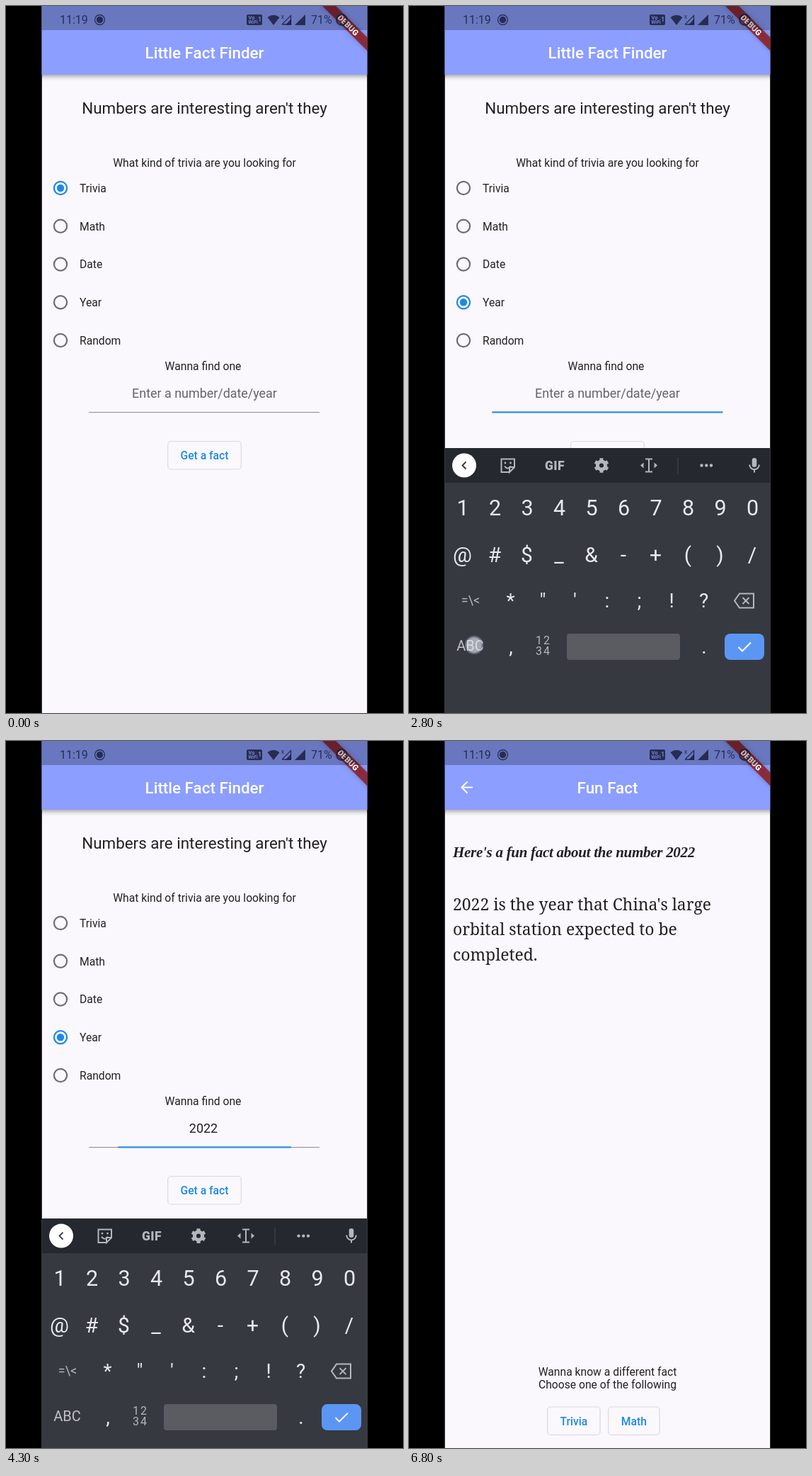
An HTML page with a canvas that plays this animation: 561x998 px, repeating every 7000 ms.

```html
<!DOCTYPE html>
<html lang="en">
<head>
<meta charset="utf-8">
<title>Number facts</title>
<style>
html, body { margin: 0; width: 100%; height: 100%; overflow: hidden; background: #000; }
canvas { display: block; }
</style>
</head>
<body>
<canvas id="stage" width="561" height="998"></canvas>
<script>
const W = 561, H = 998, LOOP = 7000, MID = 280.5;
const LEFT = 50.5, WIDTH = 460;
const BLUE = '#1e88e5', PAPER = '#faf8fc', INK = 'rgba(0,0,0,.87)', KEY = '#e8eaed', DIM = '#b4b7bc';
const SANS = 'Roboto, sans-serif', SERIF = '"Noto Serif", serif', SCRIPT = '"Liberation Serif", serif';

const screen = document.getElementById('stage').getContext('2d');
const layer = document.createElement('canvas');
layer.width = W;
layer.height = H;
const layerCtx = layer.getContext('2d');
let g = screen;

const clamp = v => Math.min(1, Math.max(0, v));
const ramp = (t, from, to) => clamp((t - from) / (to - from));

function bezier(x1, y1, x2, y2) {
  const at = (u, a, b) => 3 * u * (1 - u) * (1 - u) * a + 3 * u * u * (1 - u) * b + u * u * u;
  return x => {
    let lo = 0, hi = 1;
    for (let i = 0; i < 24; i++) {
      const m = (lo + hi) / 2;
      if (at(m, x1, x2) < x) lo = m; else hi = m;
    }
    return at(lo, y1, y2);
  };
}
const fastOutSlowIn = bezier(.4, 0, .2, 1);
const easeIn = bezier(.42, 0, 1, 1);

// y is the middle of the capital letters
function text(s, x, y, size, o = {}) {
  g.font = `${o.style || ''} ${o.weight || 400} ${size}px ${o.font || SANS}`;
  g.textAlign = o.align || 'center';
  g.letterSpacing = (o.gap || 0) + 'px';
  g.fillStyle = o.color || INK;
  g.fillText(s, x, y + size * .355);
  g.letterSpacing = '0px';
}

function box(x, y, w, h, r, color) {
  g.fillStyle = color;
  g.beginPath();
  g.roundRect(x, y, w, h, r);
  g.fill();
}

function dot(x, y, r, color) {
  g.fillStyle = color;
  g.beginPath();
  g.arc(x, y, r, 0, 7);
  g.fill();
}

function ring(x, y, r, color, width) {
  g.strokeStyle = color;
  g.lineWidth = width;
  g.beginPath();
  g.arc(x, y, r, 0, 7);
  g.stroke();
}

function path(points, color, width, fill) {
  g.beginPath();
  points.forEach(([x, y]) => g.lineTo(x, y));
  if (fill) {
    g.fillStyle = color;
    g.fill();
  } else {
    g.strokeStyle = color;
    g.lineWidth = width;
    g.stroke();
  }
}

function button(label, x, y, w) {
  g.strokeStyle = 'rgba(0,0,0,.13)';
  g.lineWidth = 1.2;
  g.beginPath();
  g.roundRect(x, y, w, 39.5, 4.5);
  g.stroke();
  text(label, x + w / 2, y + 20.2, 15.68, { weight: 500, color: BLUE });
}

function pageBase(title) {
  g.fillStyle = PAPER;
  g.fillRect(LEFT, 0, WIDTH, H);
  g.save();
  g.shadowColor = 'rgba(0,0,0,.4)';
  g.shadowBlur = 7;
  g.shadowOffsetY = 2;
  g.fillStyle = '#8c9eff';
  g.fillRect(LEFT - 10, -10, WIDTH + 20, 107);
  g.restore();
  text(title, MID, 66, 22.4, { weight: 500, color: '#fff' });
}

function radio(label, y, on) {
  ring(77, y, 9.1, on ? BLUE : 'rgba(0,0,0,.56)', 2.24);
  if (on) dot(77, y, 5.2, BLUE);
  text(label, 104, y + .3, 15.68, { align: 'left' });
}

function formPage(t) {
  pageBase('Little Fact Finder');
  text("Numbers are interesting aren't they", MID, 144, 22.4);
  text('What kind of trivia are you looking for', MID, 221.5, 15.68);
  const picked = t < 400 ? 0 : 3;
  ['Trivia', 'Math', 'Date', 'Year', 'Random'].forEach((s, i) => radio(s, 257 + i * 53.75, i === picked));
  text('Wanna find one', 278.5, 508, 15.68);

  const typed = '2022'.slice(0, [3000, 3300, 3500, 3700].filter(k => t >= k).length);
  if (typed) text(typed, 279, 546.7, 17.92);
  else text('Enter a number/date/year', MID, 546.7, 17.92, { color: 'rgba(0,0,0,.6)' });

  g.fillStyle = 'rgba(0,0,0,.42)';
  g.fillRect(117, 573, 326, 1.1);
  const focus = ramp(t, 1200, 1400) * (1 - ramp(t, 4250, 4450));
  if (focus) {
    g.fillStyle = '#2b90e2';
    g.fillRect(MID - 163 * focus, 572.3, 326 * focus, 2.2);
  }
  const caret = t < 1400 ? 0 : t < 1600 ? .65 : t < 2000 ? 1 : t < 2900 ? 0 : t < 4300 ? 1 : 0;
  if (caret) {
    g.globalAlpha = caret;
    g.fillStyle = BLUE;
    g.fillRect(279.3 + typed.length * 5.06, 536, 2.2, 21);
    g.globalAlpha = 1;
  }
  button('Get a fact', 228.7, 614.5, 103.6);
}

function factPage(t) {
  pageBase('Fun Fact');
  path([[90, 65.5], [74, 65.5]], '#fff', 2);
  path([[82.5, 57.5], [74.5, 65.5], [82.5, 73.5]], '#fff', 2);
  const styled = t >= 6200;
  const head = "Here's a fun fact about the number 2022";
  const lines = ["2022 is the year that China's large", 'orbital station expected to be', 'completed.'];
  if (styled) {
    text(head, 62, 156.5, 21, { align: 'left', font: SCRIPT, style: 'italic', weight: 700, gap: -.28 });
    lines.forEach((s, i) => text(s, 62, 230.5 + i * 35.8, 22.9, { align: 'left', font: SERIF }));
  } else {
    text(head, 62, 155, 22.4, { align: 'left' });
    lines.forEach((s, i) => text(s, 62, 227 + i * 30.1, 25.7, { align: 'left' }));
  }
  text('Wanna know a different fact', MID, 890, 15.68);
  text('Choose one of the following', MID, 908, 15.68);
  button('Trivia', 195.7, 940, 74.4);
  button('Math', 281.7, 940, 72.4);
}

function toolbar() {
  g.fillStyle = '#25282f';
  g.fillRect(LEFT, 624, WIDTH, 49);
  dot(78, 648.5, 17, '#fff');
  path([[80.5, 643.5], [75.5, 648.5], [80.5, 653.5]], '#33363d', 1.8);

  path([[142, 658], [130.5, 658], [130.5, 639.5], [149, 639.5], [149, 651], [142, 658], [142, 651], [149, 651]], DIM, 2);
  dot(136, 645, 1.4, DIM);
  dot(143.5, 645, 1.4, DIM);
  g.beginPath();
  g.arc(139.5, 648, 4.5, .3, 2.8);
  g.stroke();

  text('GIF', 206, 648.5, 17.5, { weight: 900, color: DIM, gap: .4 });

  ring(272, 648.5, 5.6, DIM, 5);
  for (let i = 0; i < 6; i++) {
    const c = Math.cos(i * Math.PI / 3 + .52), s = Math.sin(i * Math.PI / 3 + .52);
    path([[272 + 6 * c, 648.5 + 6 * s], [272 + 10.3 * c, 648.5 + 10.3 * s]], DIM, 5);
  }

  path([[339, 640], [339, 657]], DIM, 2);
  path([[334, 639.5], [344, 639.5]], DIM, 2);
  path([[334, 657.5], [344, 657.5]], DIM, 2);
  path([[331.5, 644.5], [327, 648.5], [331.5, 652.5]], DIM, 0, true);
  path([[346.5, 644.5], [351, 648.5], [346.5, 652.5]], DIM, 0, true);
  g.fillStyle = '#464950';
  g.fillRect(379.5, 637, 1, 24);
  [413.5, 420.3, 427].forEach(x => dot(x, 648.5, 2.2, DIM));

  box(484.7, 638, 6.6, 13, 3.3, DIM);
  g.strokeStyle = DIM;
  g.lineWidth = 2;
  g.beginPath();
  g.arc(488, 647.5, 6.8, 0, Math.PI);
  g.stroke();
  path([[488, 654], [488, 658.5]], DIM, 2);
}

function keyRow(keys, x, y, size) {
  [...keys].forEach((k, i) => text(k, x + i * 45.5, y, size, { color: KEY }));
}

function symbolKeys() {
  keyRow('1234567890', 76, 708, 30.5);
  keyRow('@#$_&-+()/', 75.5, 774, 30);
  text('=\\<', 87, 838.5, 18, { color: DIM });
  keyRow('*"\':;!?', 143.5, 839, 28);
  text('ABC', 86.5, 902.5, 20, { color: '#c0c2c6' });
  text('12', 190, 895.5, 16, { color: DIM, gap: 2 });
  text('34', 190, 910.5, 16, { color: DIM, gap: 2 });
}

function letterKeys() {
  keyRow('qwertyuiop', 76, 708, 27);
  [...'1234567890'].forEach((k, i) => text(k, 91 + i * 45.5, 693, 12, { color: DIM }));
  keyRow('asdfghjkl', 98.5, 774, 27);
  keyRow('zxcvbnm', 143.5, 839, 27);
  path([[87, 830], [78, 839], [83, 839], [83, 847], [91, 847], [91, 839], [96, 839], [87, 830]], DIM, 2);
  text('?123', 86.5, 902.5, 19, { color: '#c0c2c6' });
  ring(189, 903, 9, DIM, 2);
  dot(186, 900.5, 1.3, DIM);
  dot(192, 900.5, 1.3, DIM);
  g.beginPath();
  g.arc(189, 903, 4.8, .3, 2.8);
  g.stroke();
}

function keyboard(t) {
  const shown = fastOutSlowIn(ramp(t, 1520, 1750)) * (1 - fastOutSlowIn(ramp(t, 4250, 4500)));
  if (!shown) return;
  g.save();
  g.translate(0, (1 - shown) * 374);
  g.fillStyle = '#363940';
  g.fillRect(LEFT, 624, WIDTH, 374);
  toolbar();
  if (t < 2800) letterKeys(); else symbolKeys();

  path([[460, 839.5], [467, 829.5], [487, 829.5], [487, 849.5], [467, 849.5], [460, 839.5], [467, 829.5]], DIM, 2);
  path([[471.5, 835], [480.5, 844]], DIM, 2);
  path([[480.5, 835], [471.5, 844]], DIM, 2);
  text(',', 144, 904, 28, { color: KEY });
  text('.', 417, 904, 28, { color: KEY });
  box(223, 886, 160, 37, 4, '#5a5c61');
  box(446, 886, 56, 37, 8, '#5b96f5');
  path([[465.5, 905], [471, 910.5], [483, 898.5]], '#fff', 2);
  if (t >= 2900) path([[109, 968.5], [114, 973.5], [119, 968.5]], '#e8eaed', 2);
  g.restore();
}

function banner() {
  g.save();
  g.translate(LEFT + WIDTH, 0);
  g.rotate(Math.PI / 4);
  g.shadowColor = 'rgba(0,0,0,.5)';
  g.shadowBlur = 7;
  g.fillStyle = 'rgba(0,0,0,.45)';
  g.fillRect(-48, 31.4, 96, 13.4);
  g.shadowColor = 'transparent';
  g.fillStyle = 'rgba(183,28,28,.63)';
  g.fillRect(-48, 31.4, 96, 13.4);
  text('DEBUG', 0, 38.1, 11.4, { weight: 900, color: '#fff' });
  g.restore();
}

function statusBar() {
  const c = 'rgba(22,27,55,.8)';
  g.fillStyle = 'rgba(0,0,0,.25)';
  g.fillRect(LEFT, 0, WIDTH, 34);
  text('11:19', 76, 19.5, 16, { align: 'left', color: c });
  ring(132.5, 19.5, 7, c, 1.3);
  dot(132.5, 19.5, 4.7, c);

  box(340, 12, 22, 15, 2, c);
  text('Vo', 347, 16.5, 7.5, { weight: 700, color: '#7381cd' });
  text('WiFi', 349, 23, 7, { weight: 700, color: '#7381cd' });
  text('1', 358.5, 19, 9, { weight: 700, color: '#7381cd' });

  g.fillStyle = c;
  g.beginPath();
  g.moveTo(378, 27);
  g.lineTo(369.5, 16);
  g.quadraticCurveTo(378, 9.5, 386.5, 16);
  g.fill();
  text('x', 391, 14.5, 9, { color: c });
  path([[390, 26], [402.5, 13.5], [402.5, 26], [390, 26]], c, 1.3);
  path([[395, 26.5], [403, 18], [403, 26.5]], c, 0, true);
  path([[408, 27], [423, 12], [423, 27]], c, 0, true);
  text('71%', 431, 19.5, 16, { align: 'left', color: c });
  ring(474.5, 19.5, 7.3, c, 2.2);
}

// start, end, x, y of each press
const TAPS = [
  [300, 500, 118, 418], [1100, 1300, 266, 548], [2000, 2900, 92, 902],
  [2900, 3050, 121, 712], [3200, 3350, 484, 712], [3400, 3550, 121, 712],
  [3700, 3850, 121, 712], [4100, 4300, 480.5, 927], [4700, 4900, 265.5, 633.5]
];

function touches(t) {
  for (const [from, to, x, y] of TAPS) {
    if (t < from || t >= to) continue;
    g.globalAlpha = t >= 2800 && from === 2000 ? .75 : 1;
    dot(x, y, 13, 'rgba(185,195,220,.5)');
    dot(x, y, 10.8, 'rgba(255,255,255,.55)');
    g.globalAlpha = 1;
  }
}

function drawFact(t) {
  const p = ramp(t, 5666, 5966);
  if (!p) return;
  g = layerCtx;
  g.clearRect(0, 0, W, H);
  factPage(t);
  g = screen;
  g.globalAlpha = easeIn(p);
  g.drawImage(layer, 0, (1 - fastOutSlowIn(p)) * H / 4);
  g.globalAlpha = 1;
}

function draw(t) {
  g = screen;
  g.fillStyle = '#000';
  g.fillRect(0, 0, W, H);
  g.save();
  g.beginPath();
  g.rect(LEFT, 0, WIDTH, H);
  g.clip();
  if (t < 6000) formPage(t);
  drawFact(t);
  banner();
  statusBar();
  keyboard(t);
  touches(t);
  g.restore();
}

const start = performance.now();
function tick() {
  const t = (performance.now() - start) % LOOP;
  draw(Math.floor(t / 100) * 100);
  requestAnimationFrame(tick);
}
tick();
</script>
</body>
</html>
```
